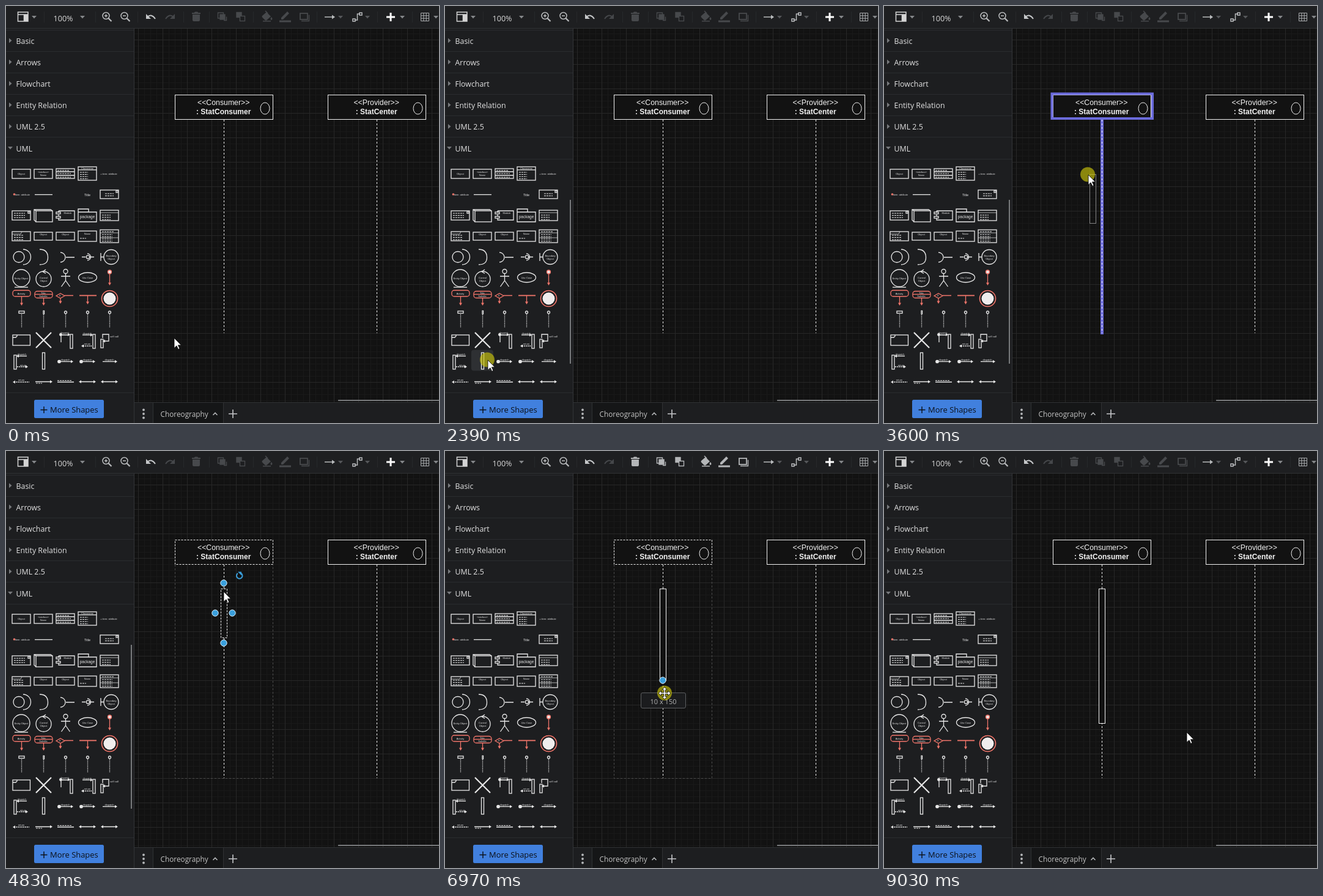
These frames come from a looping animation (708 by 682 pixels, 9.77 s). An HTML page:

```html
<!DOCTYPE html>
<html lang="en">
<head>
<meta charset="utf-8">
<title>Sequence diagram editor</title>
<style>
  html, body { margin: 0; width: 100%; height: 100%; overflow: hidden; background: #1d1e20; }
  svg { display: block; font-family: "Open Sans", sans-serif; }
  .arial { font-family: "Liberation Sans", Arial, sans-serif; }
</style>
</head>
<body>
<svg id="stage" width="708" height="682" viewBox="0 0 708 682" fill="none"></svg>
<script>
const LOOP = 9770;
const BG = '#1d1e20', PAPER = '#121212', INK = '#e8e8e8', RED = '#f2766b', BLUE = '#3a9fdc';
const stage = document.getElementById('stage');

// Markup helpers
const path = (d, a = '') => `<path d="${d}" ${a}/>`;
const rect = (x, y, w, h, a = '') => `<rect x="${x}" y="${y}" width="${w}" height="${h}" ${a}/>`;
const oval = (x, y, rx, ry = rx, a = '') => `<ellipse cx="${x}" cy="${y}" rx="${rx}" ry="${ry}" ${a}/>`;
const group = (a, ...parts) => `<g ${a}>${parts.join('')}</g>`;
const text = (x, y, s, size, a = '') =>
  `<text x="${x}" y="${y}" font-size="${size}" stroke="none" ${a}>${s.replace(/</g, '&lt;')}</text>`;
const tiny = (x, y, s, size = 4) => text(x, y, s, size, `class="arial" text-anchor="middle" fill="${INK}"`);
const fill = c => `fill="${c}" stroke="none"`;
const caret = (x, y = 18, c = '#85878a') => path(`M${x - 4} ${y - 2}h8l-4 4.5z`, fill(c));

function canvas() {
  const line = (step, c) => `<pattern id="g${step}" x="216" y="55" width="${step}" height="${step}" patternUnits="userSpaceOnUse">` +
    path(`M0 .5H${step}M.5 0V${step}`, `stroke="${c}"`) + '</pattern>';
  return `<defs>${line(10, '#191919')}${line(40, '#272727')}</defs>` +
    rect(210, 37, 498, 612, fill(PAPER)) +
    rect(210, 37, 498, 612, 'fill="url(#g10)"') + rect(210, 37, 498, 612, 'fill="url(#g40)"');
}

function lifeline(x, role, name, id) {
  const mid = `class="arial" text-anchor="middle" fill="#f2f2f2"`;
  return path(`M${x + 80.5} 186V535`, 'stroke="#f0f0f0" stroke-dasharray="3 3"') +
    rect(x + .5, 145.5, 160, 40, `id="${id}" fill="${PAPER}" stroke="#f0f0f0"`) +
    oval(x + 147.5, 167.5, 7.5, 9.5, 'stroke="#f0f0f0"') +
    text(x + 79.7, 162, `<<${role}>>`, 12.3, mid) +
    text(x + 79.7, 177, `: ${name}`, 12, mid + ' font-weight="bold"');
}

function toolbar() {
  const lens = (x, plus) => oval(x - 1.5, 16, 5.5) +
    path(`M${x + 2.5} 20l5 5`, 'stroke-width="2.2"') +
    path(`M${x - 4} 16h5${plus ? `M${x - 1.5} 13.5v5` : ''}`);
  const undo = 'M-6 1Q1 -5 7 4';
  const dividers = [62, 146, 215, 290, 332, 404, 508, 607, 664].map(x => `M${x}.5 9v18`).join('');
  return rect(0, 0, 708, 37, fill('#1e1f21')) + path('M0 36.5H708', 'stroke="#303234"') +
    path(dividers, 'stroke="#27292b"') +
    group('stroke="#d4d4d4" stroke-width="1.5"',
      rect(19.5, 10, 16.5, 15), path('M19 14h17M29.5 14v11'), rect(30, 14, 6, 11, fill('#d4d4d4'))) +
    text(77.5, 24.5, '100%', 12.6, 'fill="#d8d8d8"') +
    group('stroke="#b9bbbd" stroke-width="1.5"', lens(165, true), lens(195, false)) +
    group('transform="translate(237 17)"', path(undo, 'stroke="#c6c8ca" stroke-width="2"'), path('M-8 -4v8h8z', fill('#c6c8ca'))) +
    group('transform="translate(268 17) scale(-1 1)"', path(undo, 'stroke="#45474a" stroke-width="2"'), path('M-8 -4v8h8z', fill('#45474a'))) +
    group('id="tools"',
      path('M304 11h3.5l1.5-1.5h4l1.5 1.5h3.5v2h-14zM305 14h12v9q0 2-2 2h-8q-2 0-2-2z', 'fill="currentColor"'),
      group('stroke="currentColor" stroke-width="1.4"',
        path('M351 20h-4.500v-9h9v3M356 23.500h4.500v-6'), rect(350, 14, 8, 8, 'fill="currentColor"'),
        rect(377, 10.5, 8, 8, 'fill="currentColor"'), rect(382.500, 16.500, 8, 8, `fill="${BG}"`),
        rect(481, 12, 12, 10, 'stroke-width="1.8"'), path('M483 24.500h12.500v-10')),
      path('M419 16l7-6 7 7-6.500 6q-1.500 1-3 0l-4.500-4.500q-1-1.500 0-2.500zM434 18q3 4 0 5-3-1 0-5zM420 24h13v1.500h-13z', 'fill="currentColor"'),
      path('M424 8l4 4', 'stroke="currentColor" stroke-width="1.500"'),
      path('M450 19l10-10 3 3-10 10h-3zM447 23.500h19v3h-19z', 'fill="currentColor"')) +
    group('stroke="#b9bbbd" stroke-width="1.5"',
      path('M521 18h14'), path('M533 14.500l5 3.500-5 3.500z', fill('#b9bbbd')),
      path('M570 23h4.500v-10h4.500'), rect(567, 21, 4, 4), rect(578, 11, 4, 4)) +
    path('M629 11v14M622 18h14', 'stroke="#fff" stroke-width="3"') +
    path('M678.500 11.500h13v13h-13zM678 15.800h14M678 20.200h14M682.800 11v14M687.200 11v14', 'stroke="#a9abad"') +
    [46, 125].map(x => caret(x)).join('') + [547, 591].map(x => caret(x, 18, '#55575a')).join('') +
    caret(648) + caret(703);
}

function sections() {
  const names = ['Basic', 'Arrows', 'Flowchart', 'Entity Relation', 'UML 2.5', 'UML'];
  return rect(0, 37, 209, 645, fill(BG)) + path('M209.500 37V682', 'stroke="#333538"') +
    path([39, 74, 109, 144, 179, 214, 250, 632].map(y => `M0 ${y}.5H209`).join(''), 'stroke="#2a2c2f"') +
    names.map((n, i) => {
      const y = 57.5 + i * 35.1;
      const mark = i < 5 ? `M5 ${y - 5}v8l4.500-4z` : `M3 ${y - 3}h8l-4 4.500z`;
      return path(mark, fill('#77797c')) + text(16.500, y + 4.500, n, 12.400, 'fill="#e2e2e2"');
    }).join('');
}

const headEnd = (x, y, dir = 1) => path(`M${x} ${y}l${-4 * dir}-2.500v5z`, 'fill="currentColor" stroke="none"');
const headDown = (x, y) => path(`M${x} ${y}l-2.500-4.500h5z`, 'fill="currentColor" stroke="none"');
const dashes = (x, y, w, rows) => path(Array.from({ length: rows }, (_, i) => `M${x} ${y + i * 3.500}h${w}`).join(''),
  'stroke-width="1" stroke-dasharray="3 1"');

function palette() {
  const box = (x, y, h) => rect(x, y, 30, h);
  const classes = [
    box(10, 267, 15), tiny(25, 276, 'Object'), box(46, 267, 15), tiny(61, 273, '«interface»', 3.600), tiny(61, 278, 'Name'),
    box(82, 266, 16), path('M82 271h30M82 277h30'), dashes(84, 269, 20, 1), dashes(84, 274, 22, 1), dashes(84, 280, 22, 1),
    box(118, 263, 22), path('M118 268h30'), tiny(133, 267, 'Classname'), dashes(121, 272, 13, 4),
    tiny(168, 275.500, '+ item: attribute'),
    oval(13.500, 308, 1.800, 1.800, fill(RED)), tiny(27, 309.500, 'item: attribute'), path('M47 308.500h29'),
    tiny(133, 310.500, 'Title', 5.500), box(154, 301, 14), dashes(162, 307, 14, 2), rect(180, 302, 3, 3),
    box(10, 335, 15), dashes(13, 339, 18, 3), rect(36, 336, 3, 3), rect(49, 335, 27, 18), path('M49 353l-3-3v-17h27l3 2M46 333l3 2'),
    path('M86 335h26v15h-26v-3M86 338v-3M86 341v3'), rect(82, 337, 7, 3), rect(82, 344, 7, 3), tiny(101, 340, 'Module'),
    path('M118 337v-5h17v5M118 337h30v16h-30z'), tiny(133, 347, 'package', 6.500),
    box(154, 334, 17), path('M154 338h30', 'stroke-width=".7"'), dashes(157, 342, 14, 3),
    box(10, 369, 15), path('M26 369l-2 4h-14', 'stroke-width=".7"'), dashes(13, 375, 15, 3),
    box(46, 370, 13), tiny(61, 375, 'Object'), box(82, 370, 13), tiny(97, 375, 'Object'),
    box(118, 368, 17), tiny(133, 374, 'Name'), dashes(121, 380, 10, 1),
    box(154, 366, 21), path('M154 371h30M154 379h30', 'stroke-width=".7"'), dashes(157, 369, 20, 1), dashes(157, 374, 17, 4)];
  const roles = [
    oval(21, 410.500, 9), path('M28 398a12 12 0 0 1 0 25'), path('M55 398q13 0 13.500 12.500T55 423'),
    path('M89 403a8 8 0 0 1 0 16M98 411h14'), path('M124 410.500h6M137 410.500h7M133 405a5.500 5.500 0 0 1 0 11'), oval(134, 410.500, 2.700),
    oval(172, 410.500, 12), path('M155 404v13M155 410.500h5'), tiny(172, 410, 'Boundary'), tiny(172, 414.500, 'Object'),
    oval(25, 445, 14), path('M14 460h22'), tiny(25, 446.500, 'Entity Object'),
    oval(61.500, 446.500, 12.500), path('M65 431l-5 3.500 5 3'), tiny(61.500, 446, 'Control'), tiny(61.500, 451, 'Object'),
    oval(97.500, 434, 3.500), path('M97.500 438v11l-7 10M97.500 449l7 10M90 442h15'),
    oval(133.500, 444, 15, 8), tiny(133.500, 445.500, 'Use Case')];
  const activity = group(`stroke="${RED}" color="${RED}"`,
    oval(169.500, 435, 3, 3, 'fill="#ece6e6"'), path('M169.500 438v16'), headDown(169.500, 457),
    rect(11, 465, 29, 10, 'rx="4"'), tiny(25, 471.500, 'Activity'), path('M25.500 475v11'), headDown(25.500, 490),
    rect(47, 466.500, 29, 11, 'rx="4"'), path('M47 471.500h29'), tiny(61, 470.500, 'Title'), tiny(61, 476, 'Subtitle'),
    path('M61.500 478v8'), headDown(61.500, 490),
    path('M82 474l7-4 7 4-7 4zM96 473.500h14M89 478v6'), headDown(89, 487), tiny(88, 475, 'if'),
    path('M120 473.500h28', 'stroke-width="1.800"'), path('M133.500 474v10'), headDown(133.500, 488),
    oval(169.500, 478.500, 13, 13, 'stroke-width="1.600"'), oval(169.500, 478.500, 10, 10, 'fill="#f0eded" stroke="none"'));
  const lines = [25, 61, 97, 133, 169].map((x, i) =>
    path(`M${x + .5} 504v22`, 'stroke="#aaa" stroke-dasharray="2 .8"') +
    (i ? i > 1 ? oval(x + .5, 501, 2) : rect(x, 498.500, 1.500, 5) : rect(21, 499, 9, 3.500))).join('');
  const label = 'dispatch';
  const calls = [
    rect(11, 538, 28.500, 17), path('M11 542h5l2-2v-2'),
    path('M49 534l25 25M74 534l-25 25', 'stroke-width="2.200"'),
    rect(105, 537, 4, 23), path('M90 550v-12h13'), oval(89.500, 537.500, 1.800, 1.800, 'fill="currentColor"'), headEnd(105, 537.500), tiny(96, 536, label),
    rect(142, 537, 4, 23), path('M125 538h15'), headEnd(142, 538), path('M126 556h15', 'stroke-dasharray="2 1"'), headEnd(123, 556, -1), tiny(133, 536.500, label), tiny(133, 554, 'return'),
    rect(155, 545, 4, 14), path('M158 543v-6h10v11h-7'), headEnd(158, 548, -1), tiny(177, 542, 'self call'),
    rect(13, 571, 4, 23), path('M18 572.500h16'), headEnd(17, 572.500, -1), path('M18 590h15', 'stroke-dasharray="2 1"'), headEnd(36, 590), tiny(26, 571, label), tiny(28, 588.500, 'return'),
    rect(59.500, 567, 4, 27),
    ...[84, 120, 156].map((x, i) => path(`M${x + 2} 581.500h22`) + headEnd(x + 26, 581.500) + tiny(x + 13, 579.500, label) +
      (i < 2 ? oval(x + 3, 581.500, 2.200, 2.200, 'fill="currentColor"') : '')),
    path('M13 615h25', 'stroke-dasharray="2 1"'), headEnd(11, 615, -1), tiny(25, 613, 'return'),
    path('M48 614.500h26M84 615h27M121 614.500h24M157 614.500h24'), headEnd(76, 614.500), dashes(49, 617, 10, 1), dashes(84, 612.500, 24, 1),
    headEnd(147, 614.500), headEnd(119, 614.500, -1), headEnd(183, 614.500), headEnd(155, 614.500, -1)];
  return group(`stroke="${INK}" color="${INK}" stroke-width="1.300"`, ...classes, ...roles, activity, lines, ...calls);
}

function footer() {
  return rect(46, 644, 114, 30, 'rx="2.500" fill="#4180de"') +
    path('M62 655v11M56.500 660.500h11', 'stroke="#0c1018" stroke-width="1.400"') +
    text(72, 665, 'More Shapes', 12.950, 'fill="#0c1018"') +
    rect(210, 648, 498, 34, fill(BG)) + rect(241, 649, 114, 33, fill('#151617')) +
    path('M210 648.500H708M240.500 649V682M355.500 649V682', 'stroke="#303234"') +
    [660.500, 667, 673.500].map(y => oval(225, y, 1.900, 1.900, fill('#b4b6b8'))).join('') +
    text(252.500, 672, 'Choreography', 11.800, 'fill="#c2c2c2"') +
    path('M338.500 669l3.500-3.500 3.500 3.500', 'stroke="#b4b6b8" stroke-width="1.600"') +
    path('M371 660v14M364 667h14', 'stroke="#c6c8ca" stroke-width="1.600"') +
    rect(543, 644, 165, 2, fill('#77797b'));
}

function overlay() {
  const knob = id => oval(0, 0, 5.200, 5.200, `id="${id}" fill="${BLUE}" stroke="#d5eaf6"`);
  const arrow = 'M309 265.500l11-8.500v4.500h15v8.500h-15v4.500z';
  const hidden = 'display="none"';
  return group(`id="target" ${hidden}`,
      rect(274.500, 143.500, 164.500, 40.500, 'stroke="#6b6bdb" stroke-width="4"'),
      path('M356.500 184V537', 'stroke="#6b6bdb" stroke-width="5"'),
      path('M356.500 186V535', 'stroke="#f0f0f0" stroke-dasharray="3 3"')) +
    path('M356.500 145V536', `id="guide" stroke="#0088cf" stroke-dasharray="3 3" ${hidden}`) +
    path('M276.500 186V535.500H436.500V186', `id="parent" stroke="#4c4c4c" stroke-dasharray="3 3" ${hidden}`) +
    rect(351.500, 225.500, 10, 80, `id="bar" fill="${PAPER}" stroke="#f4f4f4"`) +
    rect(0, 0, 10, 80, 'id="ghost" stroke="#858585"') +
    group(`id="arrows" fill="${BLUE}"`, path(arrow), path(arrow, 'transform="matrix(-1 0 0 1 712 0)"')) +
    group('id="knobs"', knob('kTop'), knob('kLeft'), knob('kRight'),
      path('M384.500 200a4.800 4.800 0 1 1-5.500 0', `stroke="${BLUE}" stroke-width="2"`), path('M379 197.500h6v6z', fill(BLUE))) +
    knob('kEnd') +
    group(`id="hint" ${hidden}`, rect(0, 0, 73, 25, 'id="hintBox" rx="2.500" fill="#1b1c1e" stroke="#5c5e60"'),
      text(0, 18, '', 11, 'id="hintText" text-anchor="middle" fill="#b4b4b4"')) +
    group(`id="tip" ${hidden}`, rect(210.500, 517.500, 66, 127, `rx="2" fill="${BG}" stroke="#4b4d50"`),
      rect(238.500, 530.500, 10, 80, `stroke="${INK}"`),
      text(243.500, 632, 'Activation', 11, 'text-anchor="middle" fill="#d8d8d8"')) +
    rect(204, 317, 2, 268, `id="scroll" ${fill('#77797b')}`) +
    oval(-1, -.5, 12, 12, 'id="press" fill="#c8c30a" fill-opacity=".66"') +
    path('M0 0V16.500L4 12.800L6.700 18.500L9 17.400L6.400 11.800H11.500Z', 'id="pointer" fill="#fff" stroke="#000" stroke-width=".8"') +
    path('M0-10l4 4.500h-2.800v4.300h4.300v-2.800l4.500 4-4.500 4v-2.800h-4.300v4.300h2.800l-4 4.500-4-4.500h2.800v-4.300h-4.300v2.800l-4.500-4 4.500-4v2.800h4.300v-4.300h-2.800z',
      'id="move" fill="#fff" stroke="#000" stroke-width=".8"') +
    path('M0-11l4 5h-3v12h3l-4 5-4-5h3v-12h-3z', 'id="resize" fill="#fff" stroke="#000" stroke-width=".8"');
}

stage.innerHTML = canvas() + lifeline(276, 'Consumer', 'StatConsumer', 'head') + lifeline(526, 'Provider', 'StatCenter', 'head2') +
  sections() + rect(0, 0, 36, 34, 'id="hover" rx="4" fill="#2e3033"') + palette() + toolbar() + footer() + overlay();

const el = {};
stage.querySelectorAll('[id]').forEach(n => el[n.id] = n);
const show = (id, on) => el[id].setAttribute('display', on ? 'inline' : 'none');
const set = (id, attrs) => { for (const k in attrs) el[id].setAttribute(k, attrs[k]); };
const place = (id, x, y) => set(id, { transform: `translate(${x} ${y})` });

// Pointer path: time, x, y
const track = [
  [0, 275, 543], [370, 275, 543], [850, 155, 564], [1350, 70, 579], [2470, 70, 579], [2950, 178, 446],
  [3440, 304, 290], [3600, 334, 276], [3760, 345, 276], [3980, 349, 279], [4130, 349, 279], [4630, 356, 230],
  [4900, 356, 230], [5720, 359, 300], [6060, 359, 319], [6430, 359, 319], [6970, 359, 396], [7400, 359, 457],
  [7680, 359, 467], [8100, 359, 467], [8430, 495, 460], [LOOP, 495, 460]];

function pointerAt(t) {
  const i = track.findIndex(k => k[0] > t);
  const [t0, x0, y0] = track[i - 1], [t1, x1, y1] = track[i];
  const p = (t - t0) / (t1 - t0);
  return [x0 + (x1 - x0) * p, y0 + (y1 - y0) * p];
}

function draw(t) {
  const within = (a, b) => t >= a && t < b;
  const [x, y] = pointerAt(t);
  const dragging = within(2470, 4770), resizing = within(6350, 8100);
  const placed = t >= 4770, selected = within(4770, 8950);

  // Sidebar
  const col = Math.floor((x - 7) / 36), row = Math.floor((y - 257) / 34);
  show('hover', t < 2540 && col >= 0 && col < 5);
  place('hover', 7 + col * 36, 257 + row * 34 - .5);
  show('scroll', within(700, 5000));
  show('tip', within(1500, 2390));

  // Drag from the palette
  const snapped = within(3760, 4770), onPaper = x > 210;
  show('target', dragging && x > 276);
  show('guide', snapped);
  show('ghost', dragging);
  const gx = snapped ? 351 : onPaper ? 6 + 10 * Math.round((x - 6) / 10) : Math.round(x + 2);
  const gy = onPaper ? 5 + 10 * Math.floor((y - 5) / 10) : Math.round(y);
  place('ghost', gx + .5, gy + .5);

  // Selection and resize
  const size = t < 6430 ? 80 : t < 7680 ? 10 * Math.floor((y - 239) / 10 + 1e-6) : 220;
  const end = 225 + size;
  const dash = selected ? '3 2' : 'none';
  show('parent', selected);
  set('head', { 'stroke-dasharray': dash });
  show('bar', placed);
  set('bar', { height: size, 'stroke-dasharray': resizing ? 'none' : dash });
  show('knobs', selected && !resizing);
  show('kEnd', selected);
  place('kTop', 356, 216);
  place('kLeft', 342, 225 + size / 2);
  place('kRight', 370, 225 + size / 2);
  place('kEnd', 356, resizing ? end : end + 9);
  show('arrows', within(5780, 6350));
  set('arrows', { opacity: .2 * Math.min(1, (t - 5720) / 280) });

  const label = `10 x ${size}`, w = label.length > 7 ? 73 : 67;
  show('hint', within(6490, 8100));
  set('hintBox', { x: -w / 2, width: w });
  place('hint', 357, end + 20.5);
  el.hintText.textContent = label;

  set('tools', { color: within(4890, 8950) ? '#b4b6b8' : '#47494c' });

  // Pointer
  const kind = resizing || within(4900, 5840) || within(8100, 8170) ? 'move' : within(5840, 6350) ? 'resize' : 'pointer';
  for (const id of ['pointer', 'move', 'resize']) {
    show(id, id === kind);
    place(id, x, y);
  }
  show('press', within(2390, 4770) || resizing || within(8830, 9030));
  place('press', kind === 'pointer' ? x : x + 1, y);
}

const start = performance.now();
function tick() {
  draw((performance.now() - start) % LOOP);
  requestAnimationFrame(tick);
}
tick();
</script>
</body>
</html>
```
